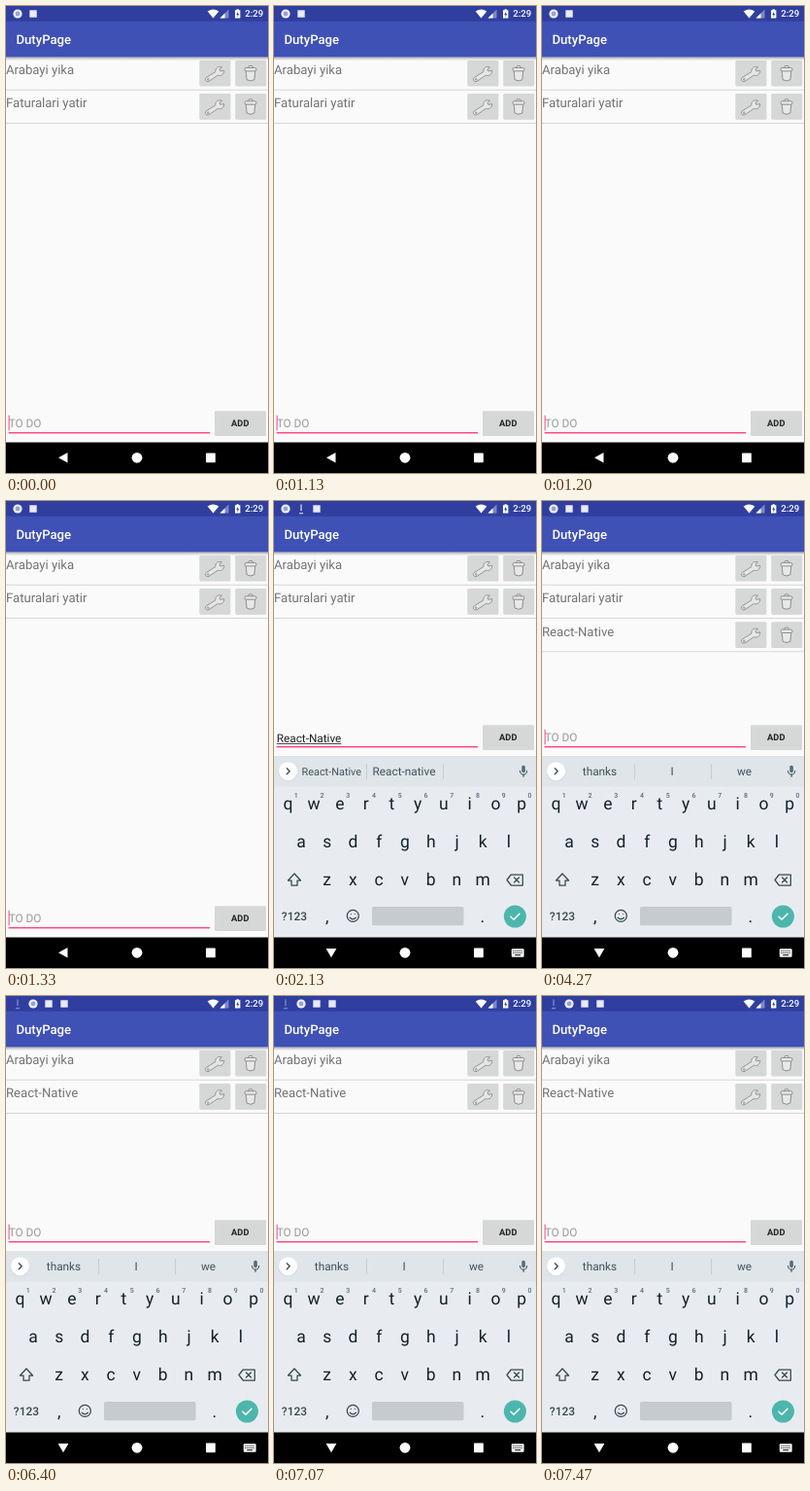
These frames come from a looping animation (270x480 px, 8000 ms). An HTML page:

```html
<!DOCTYPE html>
<html lang="en">
<head>
<meta charset="utf-8">
<title>Task app</title>
<style>
html, body { margin: 0; width: 100%; height: 100%; overflow: hidden; background: #fafafa; }
svg { display: block; width: 100vw; height: 100vh; font-family: Roboto, "Noto Sans", sans-serif; text-rendering: geometricPrecision; }
.mid { text-anchor: middle; }
.row { font-size: 13.13px; fill: #737373; }
.edit { font-size: 11.8px; }
.key { font-size: 17.5px; fill: #14212a; }
.line { fill: none; stroke: #37474f; stroke-width: 1.25; stroke-linejoin: round; stroke-linecap: round; }
.thin { stroke-width: 1; }

/* Screens: idle, typing, added, removed */
.idle, .typing, .added, .removed, .open, .after, .input { animation: 8s step-end infinite; }
.idle { animation-name: idle; }
.typing { animation-name: typing; }
.added { animation-name: added; }
.removed { animation-name: removed; }
.open { animation-name: open; }
.after { animation-name: after; }
.input { animation-name: lift; }
.removed [href="#arrow"] { opacity: .5; }
@keyframes idle { 0% { visibility: visible } 26.625%, 100% { visibility: hidden } }
@keyframes typing { 0% { visibility: hidden } 26.625% { visibility: visible } 53.375%, 100% { visibility: hidden } }
@keyframes added { 0% { visibility: hidden } 53.375% { visibility: visible } 80%, 100% { visibility: hidden } }
@keyframes removed { 0% { visibility: hidden } 80%, 100% { visibility: visible } }
@keyframes open { 0% { visibility: hidden } 26.625%, 100% { visibility: visible } }
@keyframes after { 0% { visibility: hidden } 53.375%, 100% { visibility: visible } }
@keyframes lift { 0% { transform: translateY(0) } 26.625%, 100% { transform: translateY(-186px) } }
</style>
</head>
<body>
<svg id="stage" viewBox="0 0 270 480" preserveAspectRatio="none">
  <defs>
    <linearGradient id="shade" x2="0" y2="1">
      <stop stop-color="#000" stop-opacity=".3"/>
      <stop offset="1" stop-color="#000" stop-opacity="0"/>
    </linearGradient>
    <g id="dot">
      <circle r="4.6" fill="#eef0fa"/>
      <circle r="2.4" fill="#98a1d3"/>
    </g>
    <rect id="badge" x="-3.7" y="-3.7" width="7.4" height="7.4" fill="#e8eaf6"/>
    <path id="arrow" d="M0-4.5V2.2M-2 4.6H2" fill="none" stroke="#c5cae9" stroke-width="1.4"/>
    <g id="tool">
      <rect x="-15.7" y="-13" width="31.6" height="26.5" rx="1" fill="#000" opacity=".16"/>
      <rect x="-15.7" y="-13" width="31.6" height="26" rx="1" fill="#d6d7d7"/>
    </g>
    <g id="wrench" fill="#e6e6e6" stroke="#8c8c8c" stroke-width=".9" stroke-linejoin="round">
      <path d="M-9 4.6 .6-1.4C0-5.2 3.4-7.6 7.2-6L4.6-3.9 5.6-1.9 9.4-2.7C9.6 1.2 6.4 3.4 3 2.2L-6.2 8.4C-9.4 9.4-11 6.6-9 4.6Z"/>
      <circle cx="-7" cy="6.4" r=".8"/>
    </g>
    <g id="bin" fill="#e8e8e8" stroke="#858585" stroke-width=".9" stroke-linejoin="round">
      <path d="M-4.8-3.2-3.9 6.2Q0 8.8 3.9 6.2L4.8-3.2Z"/>
      <rect x="-2" y="-8" width="4" height="3" rx="1"/>
      <rect x="-6" y="-6" width="12" height="3.4" rx="1.6"/>
    </g>
  </defs>
</svg>
<script>
const K = 26.75, PITCH = 34.3;
const use = (id, x, y) => `<use href="#${id}" x="${x}" y="${y}"/>`;
const text = (s, x, y, cls, more = '') => `<text class="${cls}" x="${x}" y="${y}" ${more}>${s}</text>`;
const group = (cls, ...parts) => `<g class="${cls}">${parts.join('')}</g>`;
const rect = (x, y, w, h, fill, more = '') =>
  `<rect x="${x}" y="${y}" width="${w}" height="${h}" fill="${fill}" ${more}/>`;

const row = (label, i) => {
  const y = i * PITCH;
  return text(label, 0, 69.9 + y, 'row')
    + use('tool', 215.3, 69 + y) + use('wrench', 215.3, 69 + y)
    + use('tool', 252.2, 69 + y) + use('bin', 252, 69.5 + y)
    + rect(0, 85.8 + y, 270, .9, '#d3d3d3');
};
const list = (cls, ...labels) => group(cls, ...labels.map(row));

// Status icons sit in 16 px slots.
const icons = (cls, ...ids) => group(cls, ...ids.map((id, i) => use(id, 12 + 16 * i, 8)));

const statusBar = rect(0, 0, 270, 15.75, '#303f9f')
  + icons('idle', 'dot', 'badge')
  + icons('typing', 'dot', 'arrow', 'badge')
  + icons('added', 'dot', 'badge', 'badge')
  + icons('removed', 'arrow', 'dot', 'badge', 'badge')
  + `<path d="M207.7 5.5Q213.5 1.5 219.3 5.5L213.5 12.5Z" fill="#fff"/>
     <path d="M229.5 3.5V12.5H220.5Z" fill="#7e88c4"/>
     <path d="M225.5 7.5V12.5H220.5Z" fill="#fff"/>
     <path d="M236 4.3H237.6V3.3H239.8V4.3H241.4V12.6H236Z" fill="#fff"/>
     <path d="M239.2 5.6 237.3 9H238.5V11.4L240.2 8H239.1Z" fill="#303f9f"/>`
  + text('2:29', 246.3, 11.4, '', 'font-size="9.6" font-weight="500" fill="#fff"');

const appBar = rect(0, 52.5, 270, 3.5, 'url(#shade)')
  + rect(0, 0, 270, 52.5, '#3f51b5')
  + text('DutyPage', 10.5, 38.8, '', 'font-size="13.13" font-weight="500" fill="#fff"');

const hint = text('TO DO', 2.7, 433, 'edit', 'fill="#999"') + rect(2.6, 420.8, 1, 15.5, '#ff4081');
const input = group('input',
  rect(2.6, 438, 207.4, 1.4, '#ff4081'),
  group('idle', hint),
  group('after', hint),
  group('typing', text('React-Native', 2.7, 433.6, 'edit', 'fill="#212121"'),
    rect(2.7, 435.2, 66.5, .8, '#212121')),
  rect(215, 417.2, 53, 24.5, '#000', 'rx="1.3" opacity=".18"'),
  rect(215, 416.3, 53, 24.6, '#d6d7d7', 'rx="1.3"'),
  text('ADD', 241.3, 431.9, 'mid', 'font-size="9.3" font-weight="700" fill="#212121"'));

const keys = (letters, x, y) => [...letters].map((c, i) => text(c, x + K * i, y, 'key mid')).join('');
const digits = [...'1234567890'].map((d, i) =>
  text(d, 22.8 + K * i, 305, 'mid', 'font-size="7" font-weight="500" fill="#546e7a"')).join('');
const word = (s, x, size = 11.8) => text(s, x, 282.3, 'mid', `font-size="${size}" fill="#3f525c"`);

const keyboard = group('open',
  rect(0, 262, 270, 186.5, '#e8ecf0'),
  rect(0, 262, 270, 31.5, '#e0e5e9'),
  `<circle cx="14.5" cy="278.4" r="9.8" fill="#c9ced2"/>
   <circle cx="14.5" cy="277.8" r="9.6" fill="#fff"/>
   <path class="line" d="M13.2 274.8 16.2 277.8 13.2 280.8"/>`,
  rect(95, 270, .8, 16, '#c1c8cd'), rect(174, 270, .8, 16, '#c1c8cd'),
  group('typing', word('React-Native', 59.3, 10.9), word('React-native', 134)),
  group('after', word('thanks', 59.5), word('I', 134), word('we', 208.5)),
  rect(255.3, 271.8, 3.6, 7.4, '#546e7a', 'rx="1.8"'),
  '<path class="line thin" d="M253.5 277.5Q253.7 281.2 257.1 281.2T260.7 277.5M257.1 281.2V283.5"/>',
  keys('qwertyuiop', 14.4, 317.2), digits,
  keys('asdfghjkl', 28, 356),
  keys('zxcvbnm', 54.6, 394.8),
  `<path class="line" d="M21 383 27.5 390H24V395.2H18V390H14.5Z"/>
   <path class="line" d="M240 389.5 244.3 384H256.3V395H244.3ZM247.5 387 252.5 392M252.5 387 247.5 392"/>`,
  text('?123', 20.9, 431, 'mid', 'font-size="11.9" font-weight="500" fill="#37474f"'),
  text(',', 54.8, 432.5, 'key mid'), text('.', 214.8, 432.5, 'key mid'),
  `<circle class="line" cx="81.3" cy="426.4" r="6"/>
   <path class="line" d="M78.2 428.3Q81.3 431.3 84.4 428.3M79.3 424.5V424.6M83.3 424.5V424.6"/>`,
  rect(101, 417, 94.5, 19.3, '#c6cbcf', 'rx="1.5"'),
  `<circle cx="248.4" cy="427" r="11.5" fill="#4db6ac"/>
   <path class="line" d="M244 427.3 247 430.3 253 424.2" style="stroke:#fff;stroke-width:1.5"/>`);

const navBar = rect(0, 448.5, 270, 31.5, '#000')
  + '<path class="idle" d="M54 464.3 63.5 459V469.6Z" fill="#fff"/>'
  + '<path class="open" d="M53.6 460H64.4L59 469.2Z" fill="#fff"/>'
  + '<circle cx="135" cy="464.3" r="5.4" fill="#fff"/>'
  + rect(206, 459.6, 9.8, 9.6, '#fff', 'rx=".6"')
  + group('open',
      rect(244.8, 460.2, 12.8, 8.6, '#fff', 'rx="1"'),
      '<path d="M246.3 462.4H256.3M246.3 464.5H256.3" stroke="#000" stroke-width="1" stroke-dasharray="1.1 .95"/>',
      rect(248.2, 466.2, 6, 1, '#000'));

document.getElementById('stage').innerHTML +=
  rect(0, 0, 270, 480, '#fafafa')
  + list('idle', 'Arabayi yika', 'Faturalari yatir')
  + list('typing', 'Arabayi yika', 'Faturalari yatir')
  + list('added', 'Arabayi yika', 'Faturalari yatir', 'React-Native')
  + list('removed', 'Arabayi yika', 'React-Native')
  + appBar + statusBar + input + keyboard + navBar;
</script>
</body>
</html>
```
